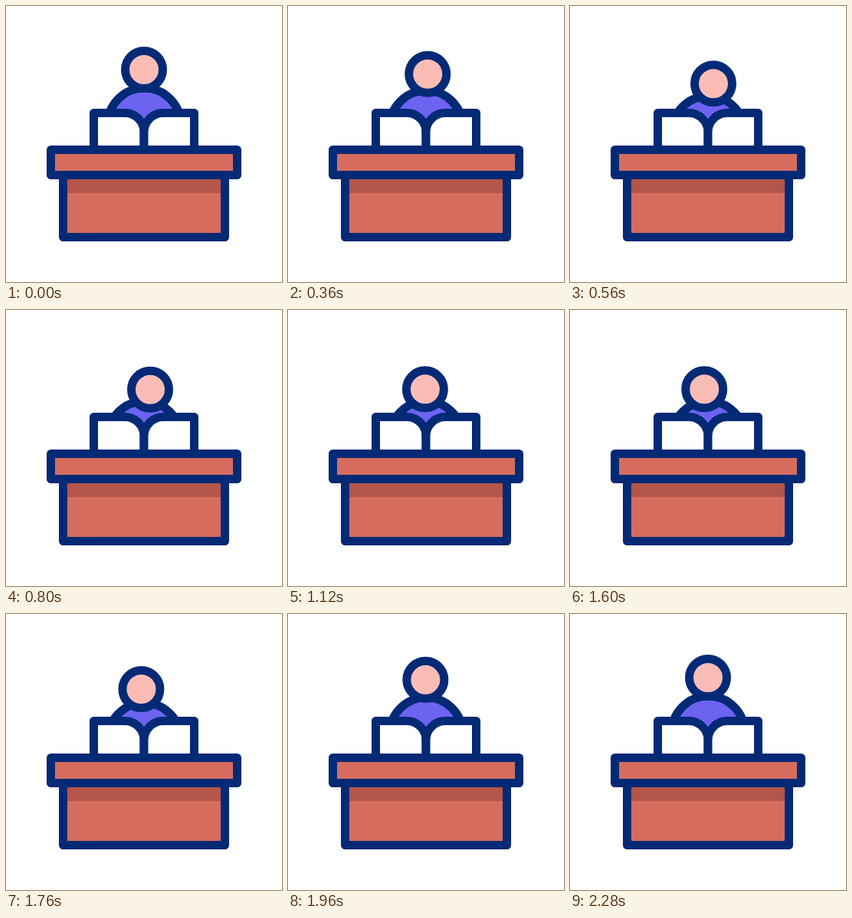
Recreate the animation shown at these times as an HTML page. Size 360 px wide and 360 px high, loop 2.4 s.

```html
<!DOCTYPE html>
<html lang="en">
<head>
<meta charset="utf-8">
<title>Reader at a desk</title>
<style>
  html, body { margin: 0; width: 100%; height: 100%; overflow: hidden; background: #fff; }
  svg { display: block; width: 100%; height: 100%; }
</style>
</head>
<body>
<svg viewBox="0 0 360 360" stroke="#042a76" stroke-width="11" stroke-linejoin="round" stroke-linecap="round">
  <circle id="body" cx="180.3" cy="154.5" r="47.5" fill="#6c63f0"/>
  <circle id="head" cx="180" cy="83" r="24.5" fill="#fcbcb6"/>
  <g fill="#fff">
    <path d="M114.5 188V139.5H155A25 25 0 0 1 180 164.5V188Z"/>
    <path d="M245.5 188V139.5H205A25 25 0 0 0 180 164.5V188Z"/>
  </g>
  <g fill="#d56c5e">
    <path d="M74.5 220.5H285.5V301.5H74.5Z"/>
    <path d="M80 226H280V244H80Z" fill="#b4554a" stroke="none"/>
    <path d="M58.5 187.5H301.5V220.5H58.5Z"/>
  </g>
</svg>
<script>
const LOOP = 2400, STEP = 40;
const head = document.getElementById('head');
const body = document.getElementById('body');

// Cubic Bezier easing (.4, 0, .2, 1), solved by bisection
function ease(x) {
  if (x <= 0) return 0;
  if (x >= 1) return 1;
  let lo = 0, hi = 1, u;
  for (let i = 0; i < 24; i++) {
    u = (lo + hi) / 2;
    const v = 1 - u;
    if (1.2 * v * v * u + 0.6 * v * u * u + u * u * u < x) lo = u;
    else hi = u;
  }
  return u * u * (3 - 2 * u);
}

const between = (t, from, to) => ease((t - from) / (to - from));

function draw(now) {
  const t = Math.floor(now % LOOP / STEP) * STEP;
  const bow = between(t, 200, 800) - between(t, 1600, 2220);
  const slide = between(t, 800, 1500);
  head.setAttribute('cx', 180 + bow * (8 - 12.8 * slide));
  head.setAttribute('cy', 83 + bow * (20.8 - 0.6 * slide));
  body.setAttribute('cy', 154.5 + bow * 12);
}

const start = performance.now();
function tick() {
  draw(performance.now() - start);
  requestAnimationFrame(tick);
}
tick();
</script>
</body>
</html>
```
